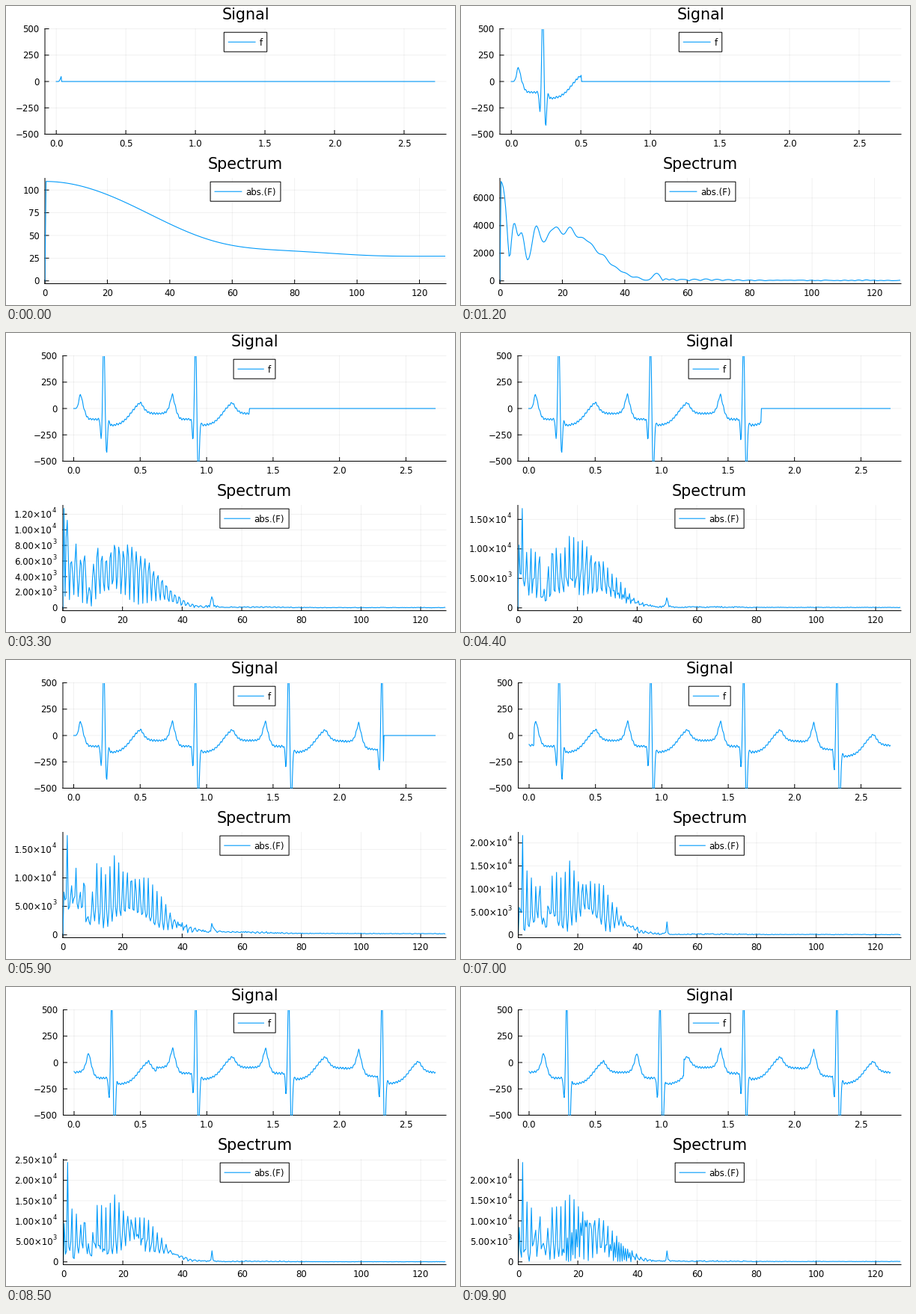
A matplotlib script for the animation above (10000 ms loop, 600 by 400 pixels).

```python
import numpy as np
import matplotlib.pyplot as plt
from matplotlib.animation import FuncAnimation
from matplotlib.patches import Rectangle

plt.rcParams.update({"font.family": "DejaVu Sans", "path.simplify": False})

W, H, DPI = 600, 400, 100
PX = 72 / DPI
FS, N, CHUNK, FRAMES = 257, 700, 10, 100
RIGHT, PLOT_H = 588, 141
BLUE = "#009afa"
LABEL, TITLE = 11.8, 20.7

R_PEAKS = (58.2, 235.7, 415.5, 596, 773, 953.5)


def bump(d, height, width):
    return height * np.exp(-(d / width) ** 2 / 2)


def wave(d, height, rise, fall):
    """Pointed hump with separate slopes before and after its top."""
    scale = np.where(d < 0, rise, fall)
    return height * np.exp(-(np.abs(d) / scale) ** 1.4)


def step(d, height, width):
    return height * (1 + np.tanh(d / (2 * width))) / 2


def heartbeat(count):
    n = np.arange(count)
    x = -48 + step(n - 565, -45, 25)
    x += 8.5 * np.sin(2 * np.pi * 50 * n / FS)
    x += np.random.default_rng(4).normal(0, 1.5, count)
    for i, r in enumerate(R_PEAKS):
        d = n - r
        # level of the PR segment, the ST segment and the rest
        x += step(d + 36, -55, 2.5) + step(d - 11, -62, 0.8)
        x += step(d - 50, 117, 8)
        x += wave(d + 45, 185, 6.5, 6.5) + wave(d - 71, 110, 24, 9)
        # Q, R, S
        x += bump(d + 5, -205, 1.45) + bump(d, 800, 1.8)
        x += bump(d - 5.2, -560, 2) if i else bump(d - 5.2, -340, 1.75)
    x[:CHUNK] = 46 * np.clip((n[:CHUNK] - 4) / 5, 0, 1) ** 1.7
    return x


SAMPLES = heartbeat(CHUNK * FRAMES)
TIME = np.arange(N) / FS
FREQ = np.arange(N // 2) * FS / N


def buffer(frame):
    """Ring buffer after the chunk of this frame was written."""
    buf = np.zeros(N)
    end = (frame + 1) * CHUNK
    n = np.arange(max(0, end - N), end)
    buf[n % N] = SAMPLES[n]
    return buf


def magnitude(buf):
    spec = np.abs(np.fft.rfft(buf))[:N // 2]
    spec[0] = 0
    return spec


def nice_ticks(peak):
    """Round steps from zero, scored by count, coverage and niceness."""
    span, top = 1.06 * peak, 1.03 * peak
    best = (-1, 0, 0)
    z = int(np.floor(np.log10(span)))
    for power in (z - 1, z):
        for q, nice in ((1, 1), (5, 0.9), (2, 0.7), (2.5, 0.5), (3, 0.2)):
            size = q * 10.0 ** power
            count = int(top // size) + 1
            if 4 <= count <= 8:
                score = (0.25 * (1 - abs(count - 5) / 5)
                         + 0.5 * span / ((count - 1) * size) + 0.25 * nice)
                best = max(best, (round(score, 9), size, count))
    return np.arange(best[2]) * best[1]


fig = plt.figure(figsize=(W / DPI, H / DPI), dpi=DPI, facecolor="white")
ax = fig.add_axes((0, 0, 1, 1))


def text(x, y, s, size=LABEL, ha="center"):
    """Text whose capitals are centred on y."""
    ax.text(x, y + 0.365 * size, s, size=size * PX, ha=ha, va="baseline",
            zorder=6)


def stroke(xs, ys, color="black", width=1.0, **kw):
    return ax.plot(xs, ys, color=color, lw=width * PX, snap=False, **kw)[0]


def y_label(left, y, value, scientific):
    if scientific and value:
        e = int(np.floor(np.log10(value) + 1e-9))
        text(left - 14.2, y, f"{value / 10 ** e:.2f}×10", ha="right")
        text(left - 14, y - 5.6, str(e), size=8.3, ha="left")
    else:
        text(left - 7.3, y, f"{value:g}".replace("-", "−"), ha="right")


def legend(left, top, name, name_w):
    line = (RIGHT - left) / 15
    width = 6 + line + 5.5 + name_w + 6
    x, y = (left + RIGHT - width) / 2, top + 4.7
    ax.add_patch(Rectangle((x, y), width, 26, fc="white", ec="black",
                           lw=PX, snap=False, zorder=4))
    stroke((x + 6, x + 6 + line), (y + 13, y + 13), BLUE, 1.1, zorder=5)
    text(x + 11.5 + line, y + 13.2, name, ha="left")


def panel(left, top, title, x_ticks, y_ticks, curve, name, name_w, sci=False):
    """x_ticks: (pixel, label) pairs, y_ticks: (pixel, value) pairs."""
    bottom = top + PLOT_H
    for x, label in x_ticks:
        stroke((x, x), (top, bottom), width=0.8, alpha=0.07, zorder=1)
        stroke((x, x), (bottom, bottom - 5), zorder=2)
        text(x, bottom + 11.8, label)
    for y, value in y_ticks:
        stroke((left, RIGHT), (y, y), width=0.8, alpha=0.07, zorder=1)
        stroke((left, left + 5), (y, y), zorder=2)
        y_label(left, y + 0.3, value, sci)
    stroke((left, left), (top, bottom), zorder=2)
    stroke((left, RIGHT), (bottom, bottom), zorder=2)
    line = stroke(*curve, BLUE, 1.1, zorder=3)
    line.set_clip_path(Rectangle((left, top), RIGHT - left, PLOT_H,
                                 transform=ax.transData))
    legend(left, top, name, name_w)
    text((left + RIGHT) / 2, top - 20, title, TITLE)


def left_edge(top_tick):
    """Left end of the plots, as wide as the longest label needs."""
    if top_tick > 10000:
        return 76 if top_tick < 20000 else 76.5
    return 57 if top_tick == 10000 else 52


def draw(frame):
    ax.clear()
    ax.set(xlim=(0, W), ylim=(H, 0))
    ax.axis("off")

    buf = buffer(frame)
    spec = magnitude(buf)
    ticks = nice_ticks(spec.max())
    left = left_edge(ticks[-1])
    width = RIGHT - left

    def sig_x(t):
        return left + width * (0.03 + t / TIME[-1]) / 1.06

    def sig_y(v):
        return 101 - v * PLOT_H / 1000

    def spec_x(f):
        return left + width * f / (FS / 2)

    def spec_y(v):
        return 230.7 + PLOT_H * (1.03 - v / spec.max()) / 1.06

    panel(left, 30.5, "Signal",
          [(sig_x(t), f"{t:.1f}") for t in np.arange(0, 2.6, 0.5)],
          [(sig_y(v), v) for v in range(-500, 501, 250)],
          (sig_x(TIME), sig_y(buf)), "f", 4.2)
    panel(left, 230.5, "Spectrum",
          [(spec_x(f), str(f)) for f in range(0, 121, 20)],
          [(spec_y(v), v) for v in ticks],
          (spec_x(FREQ), spec_y(spec)), "abs.(F)", 40.6, ticks[-1] > 10000)
    return []


anim = FuncAnimation(fig, draw, frames=FRAMES, interval=100,
                     init_func=lambda: draw(0), repeat=True)
plt.show()
```
